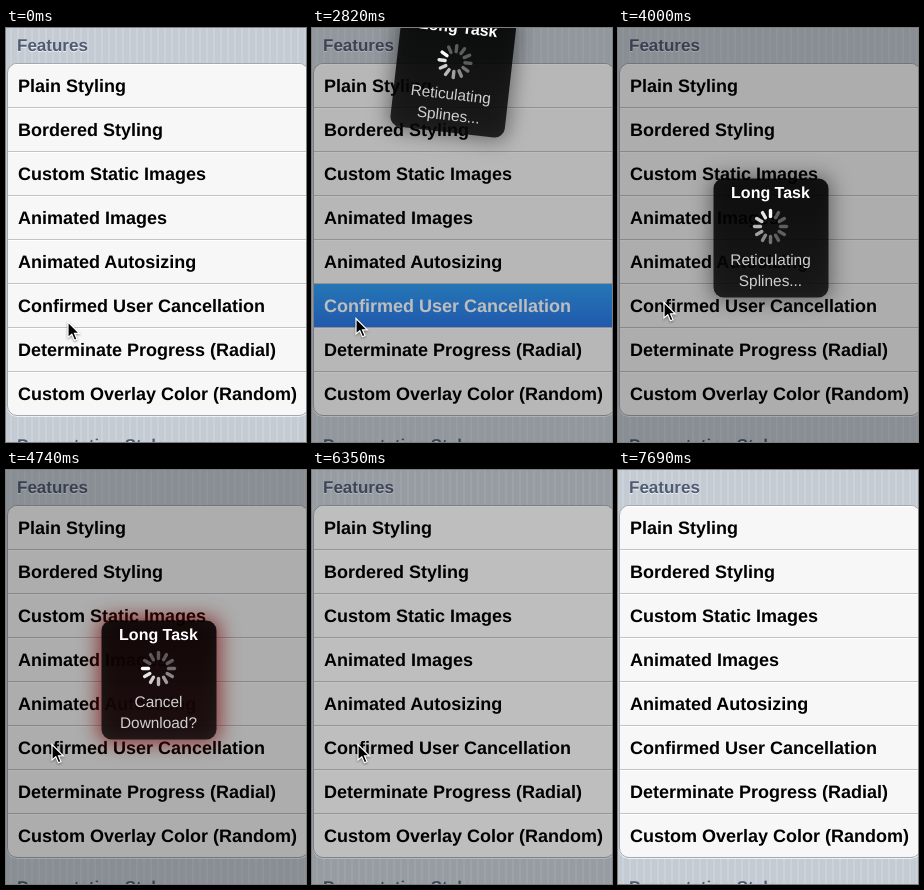
Recreate the animation shown at these times as an HTML page. Size 300x414 px, loop 8.09 s.

```html
<!DOCTYPE html>
<html lang="en">
<head>
<meta charset="utf-8">
<title>Progress HUD demo</title>
<style>
html, body { margin: 0; width: 100%; height: 100%; overflow: hidden; }
#stage {
  position: relative; width: 300px; height: 414px; overflow: hidden;
  font-family: "Liberation Sans", Arial, sans-serif;
  text-rendering: geometricPrecision;
  background: repeating-linear-gradient(90deg, #c4cbd3 0 5px, #cbd2d9 5px 7px) -1px 0;
}
#stage div, #stage svg { position: absolute; }
.head {
  left: 11px; font-weight: bold; font-size: 17px; line-height: 20px;
  color: #4f5a73; text-shadow: 0 1px rgba(255,255,255,.75); white-space: nowrap;
}
#table {
  left: 1px; top: 35px; width: 300px; height: 351px; overflow: hidden;
  border: 1px solid #a3a9b1; border-radius: 10px; background: #f7f7f7;
  box-shadow: 0 1px rgba(255,255,255,.7);
}
.row {
  left: 0; width: 100%; height: 44px; box-sizing: border-box;
  border-top: 1px solid #fff; border-bottom: 1px solid #c2c3c5;
}
.row:last-child { border-bottom: 0; }
.row span {
  position: absolute; left: 10px; top: 10px; white-space: nowrap;
  font-weight: bold; font-size: 18px; line-height: 22px;
}
.fill { inset: -1px 0 0; background: linear-gradient(#058cf5, #015de6); }
#dim { inset: 0; background: #000; }
#hud {
  left: -57.5px; top: -59.5px; width: 115px; height: 119px;
  color: #fff; text-align: center; white-space: nowrap;
}
#glow { inset: -3px; border-radius: 12px; filter: blur(10px); }
#panel {
  inset: 0; border-radius: 10px;
  background: linear-gradient(rgba(0,0,0,.87), rgba(8,8,8,.82));
}
#hud .title { top: 6px; width: 100%; font-weight: bold; font-size: 16px; line-height: 18px; }
#note { top: 71px; width: 100%; font-size: 15.4px; line-height: 21px; color: #cfcfcf; white-space: pre; }
#spin { left: 37.5px; top: 28px; }
#cursor { left: 0; top: 0; overflow: visible; filter: drop-shadow(0 1px 1px rgba(0,0,0,.4)); }
</style>
</head>
<body>
<div id="stage">
  <div class="head" style="top:8px">Features</div>
  <div id="table"></div>
  <div class="head" style="top:408px">Presentation Style</div>
  <div id="dim"></div>
  <div id="hud">
    <div id="glow"></div>
    <div id="panel"></div>
    <div class="title">Long Task</div>
    <svg id="spin" width="40" height="40" viewBox="-20 -20 40 40" stroke="#fff" stroke-width="3.4" stroke-linecap="round"></svg>
    <div id="note"></div>
  </div>
  <svg id="cursor" width="14" height="20">
    <path d="M0 0V15.5L3.8 12.2L6.4 18.3L9 17.2L6.5 11.3H11.3Z" stroke="#fff" stroke-width="1.2"/>
  </svg>
</div>
<script>
const LOOP = 8090, STEP = 147.5;
const OPEN = 2670, CONFIRM = 4440, DISMISS = 5767, GONE = 6050, CLEAR = 6800, LEAVE = 7680;
const bursts = [[1190, 2080], [OPEN, CLEAR], [7250, 7690]];
const $ = id => document.getElementById(id);

const titles = ["Plain Styling", "Bordered Styling", "Custom Static Images", "Animated Images",
  "Animated Autosizing", "Confirmed User Cancellation", "Determinate Progress (Radial)",
  "Custom Overlay Color (Random)"];
$("table").innerHTML = titles.map((title, i) =>
  `<div class="row" style="top:${i * 44}px"><span>${title}</span></div>`).join("");

const picked = $("table").children[5];
const fill = document.createElement("div");
fill.className = "fill";
picked.prepend(fill);
const label = picked.querySelector("span");

$("spin").innerHTML = Array.from({ length: 12 }, (_, i) =>
  `<line y1="-10" y2="-16" transform="rotate(${i * 30})"/>`).join("");
const spokes = [...$("spin").children];

const ramp = (t, a, b) => Math.min(1, Math.max(0, (t - a) / (b - a)));
const ease = p => p * p * (3 - 2 * p);
const fade = (t, a, b) => 1 - ramp(t, a, b) ** 1.6;

// The picture holds still between bursts and advances in even steps within them
function snap(t) {
  let held = 0;
  for (const [a, b] of bursts) {
    if (t >= a) held = Math.min(b, a + Math.floor((t - a + 10) / STEP) * STEP);
  }
  return held;
}

function drawCursor(t) {
  const aim = ease(ramp(t, 1042, 2080));
  const lift = ease(ramp(t, 2970, 3550));
  const exit = ramp(t, 7103, 7543) ** 2;
  const x = 62 - 18 * aim + 2 * lift + 114 * exit;
  const y = 294 - 3.5 * aim - 16 * lift + 109 * exit;
  $("cursor").style.transform = `translate(${x}px, ${y}px)`;
  $("cursor").style.display = t >= LEAVE ? "none" : "";
}

function drawPage(t) {
  const lit = t < OPEN ? 0 : fade(t, OPEN, 3100);
  const ink = Math.round(255 * Math.min(1, lit * 1.3));
  fill.style.opacity = lit;
  label.style.color = `rgb(${ink},${ink},${ink})`;
  $("dim").style.opacity = .3 * ramp(t, OPEN, 2840) * fade(t, 6062, CLEAR);
}

function drawHud(t) {
  const above = 1 - ease(ramp(t, OPEN, 2970));
  const fall = Math.max(0, t - DISMISS) / STEP;
  const x = 152.5 - 23 * above + 1.5 * fall;
  const y = 209.5 - 322 * above + 110 * fall ** 2;
  const turn = 12.6 * above + 8 * fall;
  $("hud").style.display = t >= OPEN && t < GONE ? "" : "none";
  $("hud").style.transform = `translate(${x}px, ${y}px) rotate(${turn}deg)`;

  const asking = t >= CONFIRM;
  const pulse = .85 + .15 * Math.cos((t - 5470) / 500 * Math.PI);
  const heat = asking ? pulse * (.35 + .65 * ramp(t, CONFIRM, 4740)) : 0;
  $("glow").style.background = `rgba(${Math.round(145 * heat)},0,0,${.42 + .36 * heat})`;
  $("note").textContent = asking ? "Cancel\nDownload?" : "Reticulating\nSplines...";

  // One turn per second, brightest spoke leading
  const head = Math.round((t - 4000) / 1000 * 12);
  spokes.forEach((spoke, i) => {
    const age = ((head - i) % 12 + 12) % 12;
    spoke.style.opacity = Math.max(.32, 1 - age * .1);
  });
}

const start = performance.now();
function tick() {
  const t = snap((performance.now() - start) % LOOP);
  drawCursor(t);
  drawPage(t);
  drawHud(t);
  requestAnimationFrame(tick);
}
tick();
</script>
</body>
</html>
```
